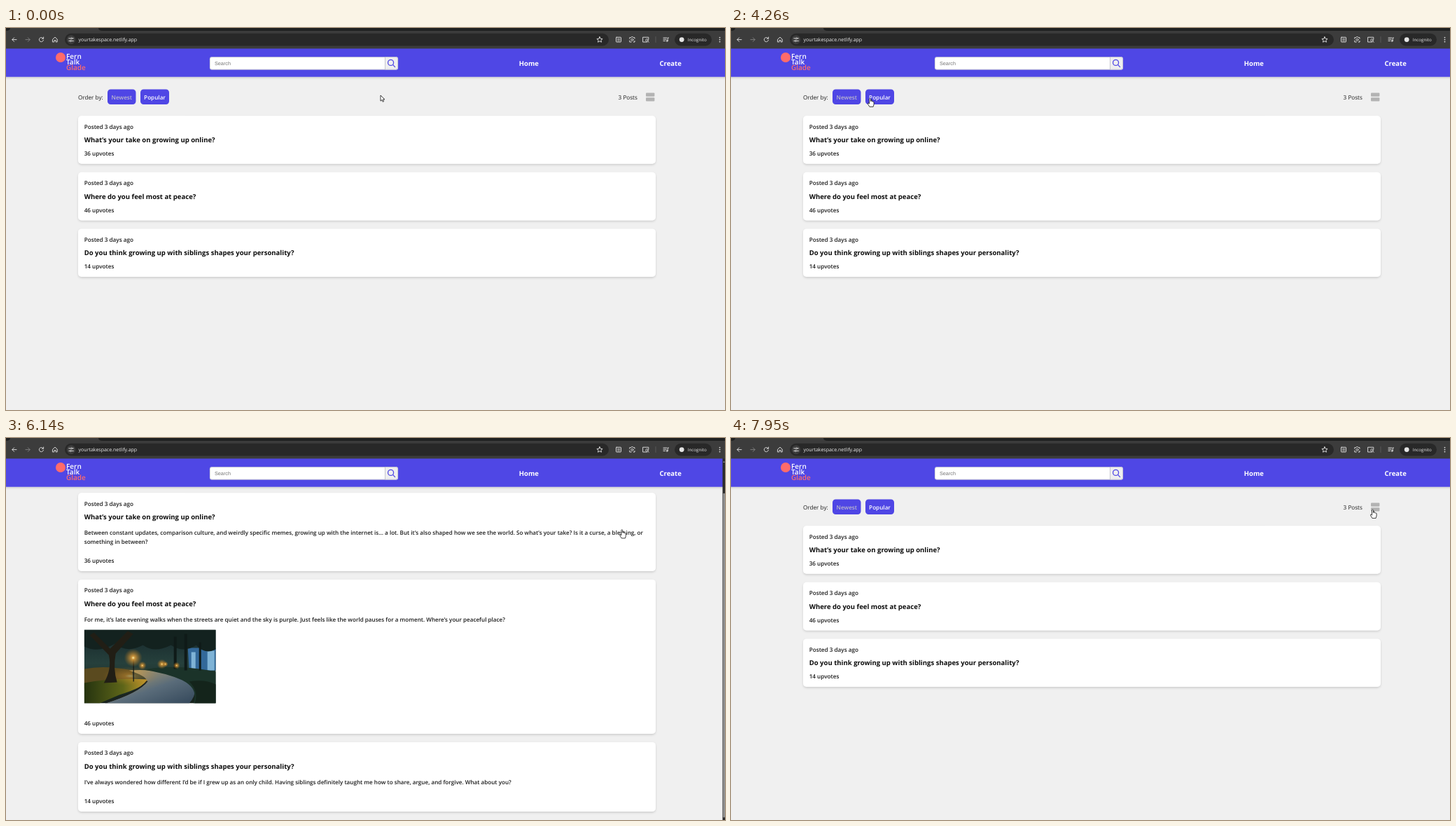
An HTML page for the animation above (8000 ms loop, 1027x545 px).

```html
<!DOCTYPE html>
<html lang="en">
<head>
<meta charset="utf-8">
<title>Post list</title>
<style>
html, body { margin: 0; width: 100%; height: 100%; overflow: hidden; background: #f0f0f0; }
svg { display: block; width: 100vw; height: 100vh; }
text { font-family: "Open Sans", "Noto Sans", sans-serif; font-size: 8.16px; fill: #1c1c1c; text-rendering: geometricPrecision; white-space: pre; }
.semi { font-weight: 600; }
.body text { font-size: 8.1px; }
.title { font-weight: 700; font-size: 9.54px; fill: #0c0c0c; }
.nav { font-weight: 700; font-size: 9.5px; fill: #fff; }
.brand { font-weight: 600; font-size: 10px; fill: #fff; }
.icon { fill: none; stroke: #d4d4d4; stroke-width: 1; stroke-linecap: round; stroke-linejoin: round; }
</style>
</head>
<body>
<svg viewBox="0 0 1027 545" preserveAspectRatio="none">
  <defs>
    <filter id="shade" x="-5%" y="-20%" width="110%" height="150%">
      <feDropShadow dx="0" dy="1.6" stdDeviation="1.6" flood-opacity=".15"/>
    </filter>
    <linearGradient id="night" x2="0" y2="1">
      <stop offset="0" stop-color="#15262a"/><stop offset=".45" stop-color="#26403c"/><stop offset="1" stop-color="#16211a"/>
    </linearGradient>
    <radialGradient id="glow">
      <stop offset="0" stop-color="#fff0a8"/><stop offset=".2" stop-color="#f0a63a" stop-opacity=".8"/>
      <stop offset="1" stop-color="#b8741a" stop-opacity="0"/>
    </radialGradient>
    <linearGradient id="path" x2="1" y2="1">
      <stop offset="0" stop-color="#e0b04c"/><stop offset=".3" stop-color="#8b8873"/>
      <stop offset=".55" stop-color="#5a6c7a"/><stop offset="1" stop-color="#33475a"/>
    </linearGradient>
    <linearGradient id="lawn">
      <stop offset="0" stop-color="#25330f"/><stop offset=".6" stop-color="#5d6519"/><stop offset="1" stop-color="#c99a2c"/>
    </linearGradient>
    <clipPath id="frame"><rect width="188" height="105"/></clipPath>
  </defs>

  <rect width="1027" height="545" fill="#f0f0f0"/>

  <g id="page">
    <text x="103" y="101.6">Order by:</text>
    <rect x="145" y="87.5" width="40.5" height="21.5" rx="4.5" fill="#4f46e5"/>
    <rect x="192" y="87.5" width="41" height="21.5" rx="4.5" fill="#4f46e5"/>
    <text id="newest" class="semi" x="165.3" y="102" text-anchor="middle">Newest</text>
    <text id="popular" class="semi" x="212.5" y="102" text-anchor="middle">Popular</text>
    <text x="874.6" y="101.6">3 Posts</text>
    <g id="compactIcon" fill="#b3b3b3">
      <rect x="914" y="92.4" width="12.4" height="5.4" rx="1"/>
      <rect x="914" y="99.2" width="12.4" height="5.4" rx="1"/>
      <rect id="flash" x="914.2" y="94" width="12.4" height="10.4" rx="1" fill="#e6e04a" opacity=".9"/>
    </g>
    <path id="fullIcon" d="M915 94.8h10.2M915 98.5h10.2M915 102.2h10.2" stroke="#adadb2" stroke-width="2"/>
    <g id="posts"></g>
  </g>

  <g id="siteHeader">
    <rect x="-10" y="29" width="1047" height="40.7" fill="#4f46e5" filter="url(#shade)"/>
    <circle cx="78" cy="42" r="7" fill="#ff6b6b"/>
    <text class="brand" x="86" y="43.6">Fern</text>
    <text class="brand" x="86" y="52">Talk</text>
    <text class="brand" x="86" y="60.4" style="fill:#ff6b6b">Glade</text>
    <rect x="291" y="41.3" width="269" height="18.2" rx="3" fill="#fff"/>
    <path d="M541.5 41.3H557a3 3 0 0 1 3 3V56.5a3 3 0 0 1-3 3H541.5z" fill="#efefef"/>
    <path d="M541.5 41.3v18.2" stroke="#b4b4c0" stroke-width=".7"/>
    <rect x="291.3" y="41.6" width="268.4" height="17.6" rx="2.7" fill="none" stroke="#a9a9c0" stroke-width=".6"/>
    <g fill="none" stroke="#4f46e5" stroke-width="1.3" stroke-linecap="round">
      <circle cx="549.6" cy="49.4" r="4"/><path d="M552.6 52.4l3 3.2"/>
    </g>
    <text x="298" y="52.6" style="font:7.25px 'Liberation Sans',Arial,sans-serif;fill:#757575">Search</text>
    <text class="nav" x="746.9" y="54" text-anchor="middle">Home</text>
    <text class="nav" x="949.2" y="54" text-anchor="middle">Create</text>
  </g>

  <g id="scrollbar">
    <rect x="1023.5" y="29" width="3.5" height="516" fill="#2b2b2b"/>
    <path d="M1024.2 35l1.3-2 1.3 2zM1024.2 540l1.3 2 1.3-2z" fill="#9f9f9f"/>
    <rect id="thumb" x="1024.4" width="2.4" height="462" rx="1.2" fill="#9f9f9f"/>
  </g>

  <g id="browser">
    <rect width="1027" height="29.4" fill="#3c3c3c"/>
    <path d="M0 0H6Q6 4 0 4zM132 0H1027V4H138Q132 4 132 0z" fill="#1f2020"/>
    <rect x="84" y="7.8" width="777" height="17.6" rx="8.8" fill="#282828"/>
    <rect x="955" y="7.8" width="53" height="17.6" rx="8.8" fill="#282828"/>
    <circle cx="93" cy="16.6" r="6.3" fill="#3e3e3e"/>
    <g class="icon">
      <path d="M15 16.6H9M11.6 13.8L8.8 16.6l2.8 2.8"/>
      <path d="M28 16.6h6M31.4 13.8l2.8 2.8-2.8 2.8" stroke="#7c7c7c"/>
      <path d="M53 14.8a3.1 3.1 0 1 0 .5 2.4M53.6 13v2.2h-2.2"/>
      <path d="M66.8 16l3.2-2.9 3.2 2.9v3.9h-2.1v-2.4h-2.2v2.4h-2.1z"/>
      <path d="M89.8 14.8h2.4M95 14.8h1.4M89.8 18.4h1.4M94 18.4h2.4"/>
      <circle cx="93.6" cy="14.8" r="1"/><circle cx="92.4" cy="18.4" r="1"/>
      <path d="M848 12.6l1.2 2.6 2.9.3-2.2 1.9.6 2.8-2.5-1.4-2.5 1.4.6-2.8-2.2-1.9 2.9-.3z"/>
      <rect x="871.5" y="13.2" width="7" height="6.8" rx=".6"/><path d="M873.4 15.2h3.4M873.4 16.7h3.4M873.4 18.2h3.4" stroke-width=".7"/>
      <path d="M890.8 15.2v-1.6h2l.6-.9h2l.6.9h2v1.6M890.8 18v2h2.4M898 18.4v1.6h-1.6"/><circle cx="894.4" cy="16.8" r="1.5"/>
      <path d="M916 20h-6.4v-6.8h8.2v3"/><circle cx="915.5" cy="17.4" r="1.7"/><path d="M916.8 18.7l1.4 1.5"/>
      <path d="M928 12.5v8" stroke="#606060" stroke-width=".8"/>
      <path d="M939 14h5M939 16.2h4M939 18.4h2.4M945.2 18.4v-4.4h1.4"/><circle cx="944.2" cy="18.4" r="1"/>
    </g>
    <circle cx="965.2" cy="16.6" r="3.4" fill="#e4e4e4"/>
    <g fill="#dcdcdc"><circle cx="1019.5" cy="13.6" r=".9"/><circle cx="1019.5" cy="16.6" r=".9"/><circle cx="1019.5" cy="19.6" r=".9"/></g>
    <text x="103.6" y="19.3" style="font-size:7px;fill:#ececec">yourtakespace.netlify.app</text>
    <text x="973.8" y="18.9" style="font-size:6.2px;fill:#ececec">Incognito</text>
  </g>

  <g id="cursor" stroke="#111" stroke-width=".8" stroke-linejoin="round" fill="#fff">
    <path id="arrow" d="M0 0V8.2L1.9 6.5 3.2 9.3 4.6 8.7 3.4 5.9H6z"/>
    <path id="hand" d="M-1 .9Q0-.6 1 .9V4.6Q2-.1 2.7 4.8 3.6 4 4.2 5.2 5.4 4.6 5.6 6V9L4.6 12.4H-.6L-3 8.4Q-3.4 6.8-2 7.2L-1 8.2z"/>
  </g>
</svg>

<script>
const LOOP = 8000;
const MAX_SCROLL = 47;
const $ = id => document.getElementById(id);

const posts = [
  { title: "What’s your take on growing up online?", votes: 36, height: 111.7, votesY: 99.6,
    body: ["Between constant updates, comparison culture, and weirdly specific memes, growing up with the internet is... a lot. But it’s also shaped how we see the world. So what’s your take? Is it a curse, a blessing, or",
           "something in between?"] },
  { title: "Where do you feel most at peace?", votes: 46, height: 220, votesY: 208, photo: true,
    body: ["For me, it’s late evening walks when the streets are quiet and the sky is purple. Just feels like the world pauses for a moment. Where’s your peaceful place?"] },
  { title: "Do you think growing up with siblings shapes your personality?", votes: 14, height: 99, votesY: 87,
    body: ["I’ve always wondered how different I’d be if I grew up as an only child. Having siblings definitely taught me how to share, argue, and forgive. What about you?"] },
];
const byNewest = [0, 1, 2];
const byPopular = [1, 0, 2];

function photo() {
  const lamps = [[70, 40, 13], [83, 51, 6], [111, 49, 7], [132, 51, 5], [116, 49, 4]];
  return `<g transform="translate(8.7 71.7)" clip-path="url(#frame)">
    <rect width="188" height="105" fill="url(#night)"/>
    <path d="M148 26H188V58H150z" fill="#33699a"/>
    <path d="M153 32h6v26h-6zM176 30h10v28h-10z" fill="#7fb3d6"/>
    <path d="M0 0H188V28Q172 36 160 22 142 34 124 22 100 34 84 22 60 34 44 20 20 34 0 24z" fill="#13221f"/>
    <path d="M0 56Q30 50 68 58L70 72 0 84z" fill="#5a4a1f"/>
    <path d="M0 76Q40 68 92 71 86 82 50 93L22 105H0z" fill="url(#lawn)"/>
    <path d="M64 58Q92 56 116 61 152 68 158 82 160 94 150 105H30Q80 89 90 73 88 66 64 58z" fill="url(#path)"/>
    <path d="M90 73Q78 89 30 104" fill="none" stroke="#1d2320" stroke-width="2"/>
    <path d="M84 57Q130 48 188 60V105H156Q164 84 140 72 118 62 84 57z" fill="#1b3329"/>
    <path d="M150 74Q172 70 188 78V105H158Q164 88 150 74z" fill="#14241b"/>
    <ellipse cx="66" cy="66" rx="40" ry="14" fill="url(#glow)" opacity=".45"/>
    <path d="M28 76Q40 56 35 36L8 8 14 4 37 27 62 2 70 6 45 34Q41 56 47 75z" fill="#211e15"/>
    <path d="M128 56V10h4v46zM143 58V6h4v52zM164 58V18h3v40z" fill="#0f1a18"/>
    <path d="M70.5 42V74" stroke="#171b16" stroke-width="1.3"/>
    ${lamps.map(([x, y, r]) => `<circle cx="${x}" cy="${y}" r="${r}" fill="url(#glow)"/>`).join("")}
  </g>`;
}

$("posts").innerHTML = posts.map(post => `<g>
  <rect class="card" width="825" rx="5" fill="#fff" filter="url(#shade)"/>
  <text class="semi" x="8.7" y="18.4">Posted 3 days ago</text>
  <text class="title" x="8.7" y="38.1">${post.title}</text>
  <g class="body">
    ${post.body.map((line, i) => `<text class="semi" x="8.7" y="${60 + i * 12.8}">${line}</text>`).join("")}
    ${post.photo ? photo() : ""}
  </g>
  <text class="semi votes" x="8.7">${post.votes} upvotes</text>
</g>`).join("");
const cards = [...$("posts").children];

const clamp = v => Math.max(0, Math.min(1, v));
const ramp = (t, from, to) => clamp((t - from) / (to - from));
const smooth = x => x * x * (3 - 2 * x);
const show = (node, on) => node.setAttribute("display", on ? "inline" : "none");

// time, x, y of the pointer tip
const route = [
  [330, 535, 96], [1180, 207, 99], [2400, 207, 99], [2460, 197.5, 98.5], [2860, 165, 100],
  [4195, 165, 100], [4260, 198.5, 100], [5000, 896, 101], [5300, 920.5, 100], [5740, 920.5, 100],
  [6000, 882.5, 129], [6270, 877.5, 132], [6410, 877.5, 132], [6470, 874.5, 132.5],
  [6550, 874.5, 132.5], [6670, 872, 136], [6740, 872, 136], [6810, 873, 136.5], [7090, 873, 136.5],
  [7560, 920, 100], [7880, 919.5, 99.5], [7950, 916.5, 102],
];

function pointerAt(t) {
  const i = route.findIndex(stop => stop[0] > t);
  if (i === 0) return route[0].slice(1);
  if (i < 0) return route[route.length - 1].slice(1);
  const [t0, x0, y0] = route[i - 1];
  const [t1, x1, y1] = route[i];
  const k = smooth(ramp(t, t0, t1));
  return [x0 + (x1 - x0) * k, y0 + (y1 - y0) * k];
}

function dimmed(amount) {
  const mix = end => Math.round(255 + (end - 255) * amount);
  return `rgb(${mix(188)},${mix(184)},${mix(205)})`;
}

function draw(t) {
  const popular = ramp(t, 1650, 1800) - ramp(t, 3260, 3400);
  const full = t >= 5400 && t < 7640;
  const scroll = MAX_SCROLL * (smooth(ramp(t, 5978, 6130)) - smooth(ramp(t, 6788, 6940)));

  $("newest").style.fill = dimmed(1 - popular);
  $("popular").style.fill = dimmed(popular);
  show($("compactIcon"), !full);
  show($("fullIcon"), full);
  show($("flash"), t >= 5300 && t < 5400);
  show($("scrollbar"), full);
  $("thumb").setAttribute("y", 37 + scroll * 0.89);
  $("page").setAttribute("transform", `translate(0 ${-scroll})`);

  const [x, y] = pointerAt(t);
  let overLink = y > 87 && y < 109 && ((x > 145 && x < 185.5) || (x > 192 && x < 233) || (x > 913 && x < 927));
  let top = 125.2;
  const order = t >= 1730 && t < 3330 ? byPopular : byNewest;
  for (const i of order) {
    const post = posts[i], card = cards[i];
    const height = full ? post.height : 68.6;
    card.setAttribute("transform", `translate(103 ${top})`);
    card.querySelector(".card").setAttribute("height", height);
    card.querySelector(".votes").setAttribute("y", full ? post.votesY : 57);
    show(card.querySelector(".body"), full);
    overLink ||= y + scroll > top && y + scroll < top + height;
    top += height + 12;
  }

  $("cursor").setAttribute("transform", `translate(${x} ${y})`);
  show($("hand"), overLink);
  show($("arrow"), !overLink);
}

const start = performance.now();
function tick() {
  draw((performance.now() - start) % LOOP);
  requestAnimationFrame(tick);
}
tick();
</script>
</body>
</html>
```
